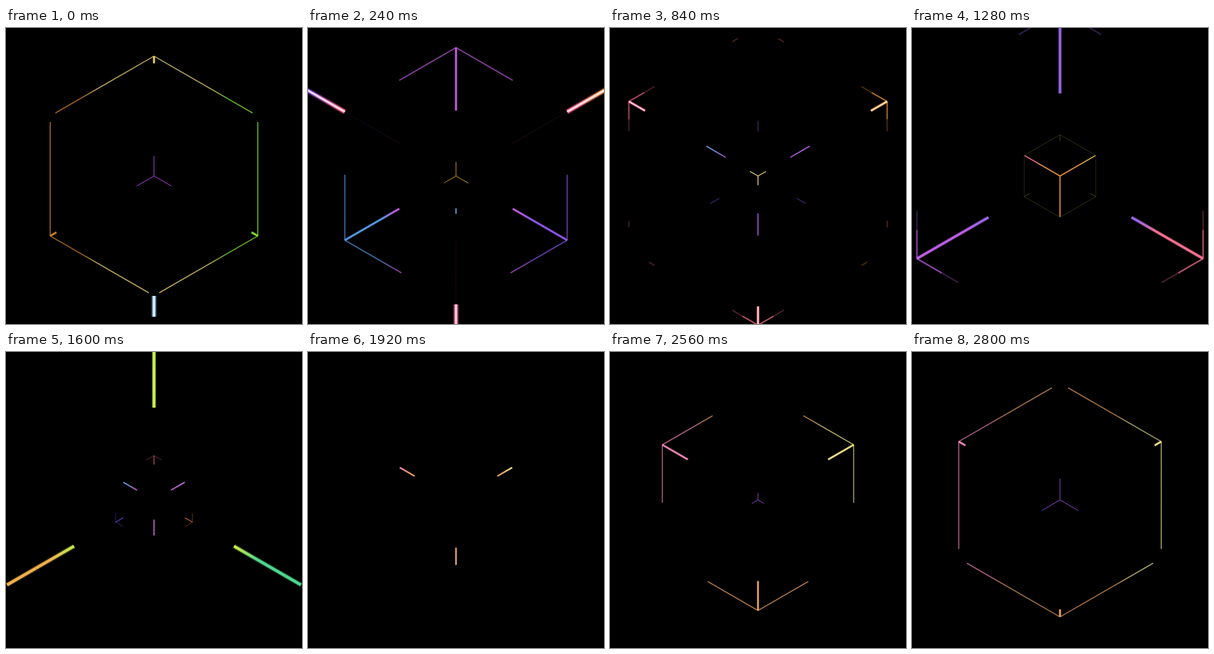
An HTML page with a canvas that plays this animation: 400x400 px, repeating every 2.88 s.

```html
<!DOCTYPE html>
<html lang="en">
<head>
<meta charset="utf-8">
<title>Hexagon light pulses</title>
<style>
html, body { margin: 0; width: 100%; height: 100%; overflow: hidden; background: #000; }
canvas { display: block; width: 400px; height: 400px; }
</style>
</head>
<body>
<canvas id="stage" width="400" height="400"></canvas>
<script>
const ctx = document.getElementById('stage').getContext('2d');
const LOOP = 2880, STEP = 40, LAST = 2800;
const UP = -90, DOWN = 90;
const pulses = [];

// Linear interpolation over rows of [time, value, ...]
function sample(keys, t) {
  let i = 1;
  while (i < keys.length - 1 && keys[i][0] < t) i++;
  const a = keys[i - 1], b = keys[i];
  const f = (t - a[0]) / (b[0] - a[0]);
  return a.slice(1).map((v, n) => v + (b[n + 1] - v) * f);
}

const zoom = [[0, 162], [240, 173.5], [840, 201.5], [1280, 223.3], [2240, 277], [2800, 316]]
  .map(([t, r]) => [t, Math.log(r)]);

// Keys are [time, tail, head]: 0..1 runs out from the centre, 1..2 along the hexagon.
function pulse(size, side, colors, keys, opts = {}) {
  pulses.push({ size, side, colors, keys, alpha: 1, edge: 0.75, ...opts });
}

pulse(1, UP, ['#c87c2c', '#e8d070', '#7ede30'],
  [[0, 0.94, 1.95], [80, 1.1, 2], [200, 1.9, 2]], { edge: 0.85 });
pulse(2, DOWN, ['#8cc0ff', '#8cc0ff', '#8cc0ff'],
  [[0, 0.5, 0.587], [160, 0.55, 0.75]], { single: true, hot: true });
pulse(0.25, UP, ['#a040c8', '#a040c8', '#a040c8'],
  [[0, 0, 0.67], [80, 0.2, 1], [160, 0.5, 1.5]], { width: 1 });
pulse(1, UP, ['#559ae6', '#c05cdc', '#9058f0'],
  [[40, 0.5, 0.6], [240, 0.51, 1.51], [440, 0.85, 1.9], [560, 1.5, 2]], { edge: 0.68 });
pulse(2, DOWN, ['#7448f0', '#f0608c', '#f0a038'],
  [[80, 0.5, 0.6], [240, 0.5, 1], [480, 0.75, 1.4]], { hot: true });
pulse(1, DOWN, ['#20285a', '#5a2426', '#5a2426'],
  [[120, 0.5, 1], [360, 0.5, 1]], { alpha: 0.3, width: 1 });
pulse(0.125, UP, ['#a07024', '#b8822c', '#c8b83c'],
  [[120, 0, 0.3], [240, 0, 0.88], [400, 0.5, 1.4], [520, 1, 2]], { width: 1 });
pulse(0.5, DOWN, ['#70b8ec', '#70b8ec', '#70b8ec'],
  [[120, 0.5, 0.53], [240, 0.5, 0.59], [400, 0.55, 0.7]], { single: true });

pulse(1, DOWN, ['#f05c8c', '#f87888', '#f09a38'],
  [[480, 0.5, 0.6], [720, 0.7, 1.08], [840, 0.875, 1.2], [1080, 1, 1.4]],
  { hot: true, soft: true });
pulse(1, DOWN, ['#7c3450', '#804030', '#805020'],
  [[720, 1.76, 1.8], [840, 1.8, 1.845], [960, 1.84, 1.9]], { alpha: 0.7 });
pulse(0.5, DOWN, ['#74a4ec', '#ae58d8', '#bc66e8'],
  [[560, 0.5, 0.52], [840, 0.5, 0.8], [1000, 0.7, 1], [1100, 0.95, 1.3]]);
pulse(0.5, UP, ['#30307c', '#56286c', '#48247a'],
  [[720, 0.5, 0.65], [840, 0.6, 0.74], [960, 0.7, 0.84]], { alpha: 0.75 });
pulse(0.0625, DOWN, ['#d8c878', '#d8c878', '#d8c878'],
  [[640, 0, 0.2], [840, 0, 1], [960, 0.6, 1.5], [1040, 1, 2]], { width: 1.3 });

pulse(0.25, DOWN, ['#e06a88', '#e08c3c', '#d0a848'],
  [[1040, 0, 0.2], [1280, 0, 0.99], [1400, 0.5, 1.3], [1560, 1, 2]], { width: 1.6 });
pulse(0.25, UP, ['#565c28', '#565c28', '#565c28'],
  [[1120, 0.6, 1.6], [1280, 0.84, 2], [1440, 1.5, 2]], { alpha: 0.6, edge: 0.6, width: 1.1 });
pulse(1, UP, ['#bc5ee4', '#9a66ec', '#f4708e'],
  [[960, 0.5, 0.55], [1120, 0.5, 1.05], [1280, 0.5, 1.29], [1480, 0.5, 1.05]],
  { soft: true });

pulse(1, UP, ['#f0b04c', '#c6e84c', '#4cd890'],
  [[1440, 0.5, 1], [1600, 0.52, 0.956], [1680, 0.52, 0.89], [1920, 0.52, 0.53]],
  { width: 4 });
pulse(0.25, UP, ['#5a38c0', '#a44e5c', '#a8602a'],
  [[1480, 0.5, 1], [1600, 0.8, 1.2], [1720, 0.92, 1.5], [1840, 1.3, 2]],
  { edge: 0.4, width: 1.3 });
pulse(0.25, DOWN, ['#6498d8', '#b860cc', '#c070dc'],
  [[1440, 0.4, 0.5], [1600, 0.44, 0.8], [1760, 0.6, 1], [1880, 0.9, 1.4]], { width: 1.6 });

pulse(0.5, DOWN, ['#f486b8', '#e8a460', '#f0e48c'],
  [[1760, 0.5, 0.52], [2240, 0.5, 1], [2520, 0.7, 1.46], [2800, 0.935, 1.92], [2880, 0.96, 1.95]]);
pulse(0.125, UP, ['#482070', '#482070', '#482070'],
  [[2080, 0.5, 1.1], [2240, 0.85, 1.4], [2440, 1.1, 2]], { edge: 0.6, width: 1 });
pulse(0.25, UP, ['#b83a9c', '#b83a9c', '#b83a9c'],
  [[2080, 0.5, 0.52], [2240, 0.49, 0.57], [2440, 0.6, 0.75]], { width: 1.3 });
pulse(0.125, UP, ['#5040c0', '#8440b0', '#7040bc'],
  [[2480, 0, 0.1], [2800, 0, 0.73], [2880, 0, 0.8]], { width: 1 });

// Three colour bands from left to right
function bands(r, [left, mid, right]) {
  const g = ctx.createLinearGradient(-0.866 * r, 0, 0.866 * r, 0);
  g.addColorStop(0.16, left);
  g.addColorStop(0.23, mid);
  g.addColorStop(0.77, mid);
  g.addColorStop(0.84, right);
  return g;
}

function polar(r, deg) {
  const a = deg * Math.PI / 180;
  return [r * Math.cos(a), r * Math.sin(a)];
}

function line(p, q, from, to, style, width, alpha) {
  const at = f => [p[0] + (q[0] - p[0]) * f, p[1] + (q[1] - p[1]) * f];
  ctx.strokeStyle = style;
  ctx.lineWidth = width;
  ctx.globalAlpha = alpha;
  ctx.beginPath();
  ctx.moveTo(...at(from));
  ctx.lineTo(...at(to));
  ctx.stroke();
}

function drawPulse(p, t, scale) {
  const start = p.keys[0][0], end = p.keys[p.keys.length - 1][0];
  if (t < start || t >= end) return;
  const fadeIn = start ? Math.min(1, (t - start) / 80) : 1;
  const fadeOut = end < LOOP ? Math.min(1, (end - t) / 80) : 1;
  const alpha = p.alpha * fadeIn * fadeOut;
  const [tail, head] = sample(p.keys, t);
  const r = scale * p.size;
  const style = bands(r, p.colors);
  const w = p.width || Math.max(1.4, r * 0.0145);
  const thin = p.width && r < 100 ? w : Math.max(1.2, r * 0.0085);

  for (const turn of p.single ? [0] : [0, 120, 240]) {
    const dir = p.side + turn, corner = polar(r, dir);
    if (head > 1) {
      const from = Math.max(0, tail - 1), to = Math.min(1, head - 1);
      for (const bend of [-60, 60]) {
        const next = polar(r, dir + bend);
        if (p.soft) {
          const mid = from + (to - from) * 0.6;
          line(corner, next, from, mid, style, thin, alpha * p.edge);
          line(corner, next, mid, to, style, thin, alpha * 0.3);
        } else {
          line(corner, next, from, to, style, thin, alpha * p.edge);
        }
      }
    }
    if (tail < 1) {
      const to = Math.min(1, head);
      if (w > 1.8) line([0, 0], corner, tail, to, style, w * 1.6, alpha * 0.25);
      line([0, 0], corner, tail, to, style, w, alpha);
      if (p.hot) line([0, 0], corner, tail, to, '#fff', w * 0.5, alpha * 0.8);
    }
  }
}

function frame(now) {
  const t = Math.min(LAST, Math.floor(now % LOOP / STEP) * STEP);
  const scale = Math.exp(sample(zoom, t)[0]);
  ctx.setTransform(1, 0, 0, 1, 0, 0);
  ctx.globalAlpha = 1;
  ctx.fillStyle = '#000';
  ctx.fillRect(0, 0, 400, 400);
  ctx.translate(200, 200);
  for (const p of pulses) drawPulse(p, t, scale);
}

const begin = performance.now();
function tick() {
  frame(performance.now() - begin);
  requestAnimationFrame(tick);
}
tick();
</script>
</body>
</html>
```
